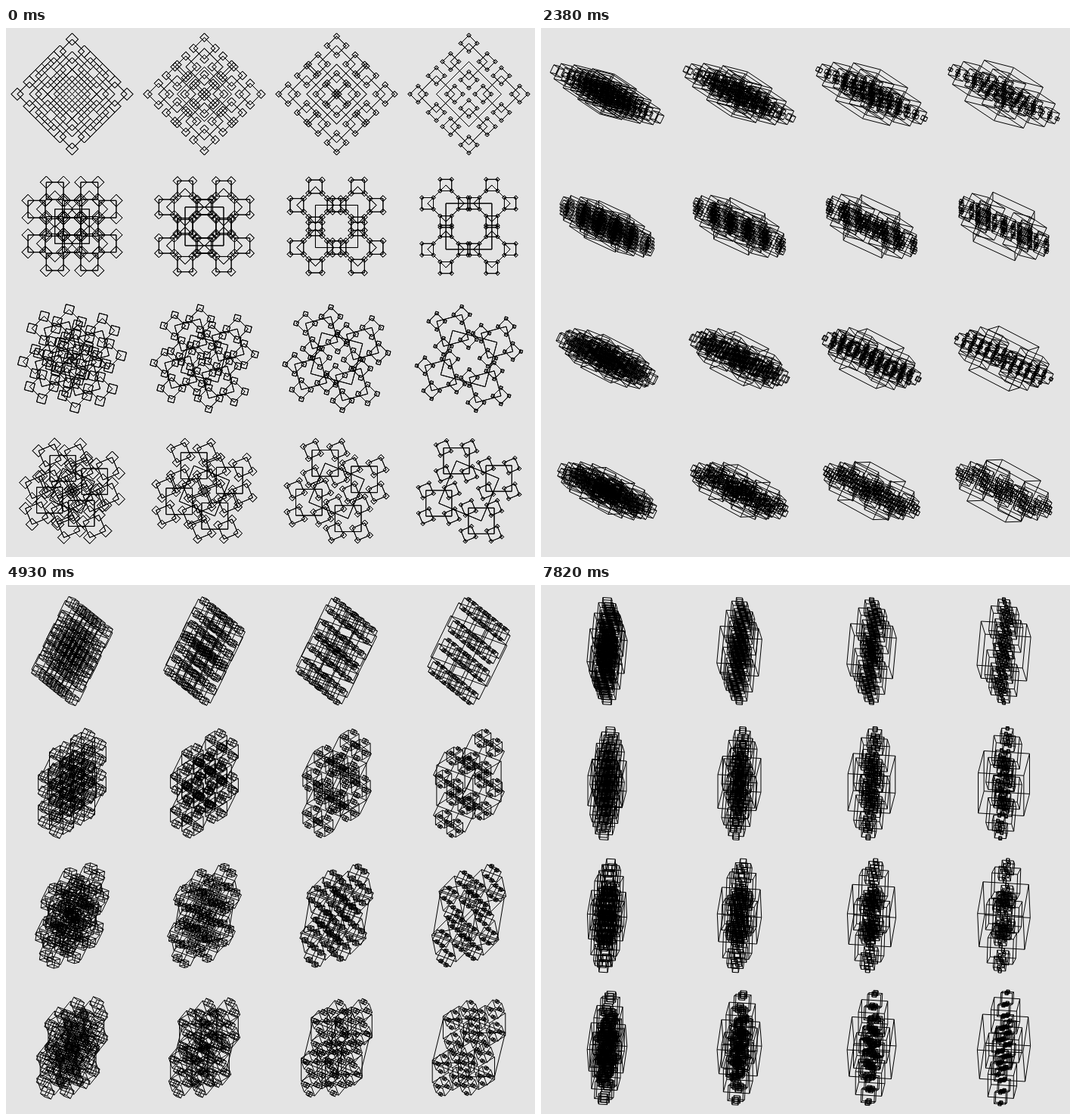
An HTML page with a canvas that plays this animation: 700x700 px, repeating every 7.99 s.

```html
<!DOCTYPE html>
<html lang="en">
<head>
<meta charset="utf-8">
<title>Nested boxes</title>
<style>
  html, body { margin: 0; width: 100%; height: 100%; overflow: hidden; background: #e4e4e4; }
  canvas { display: block; }
</style>
</head>
<body>
<canvas id="stage" width="700" height="700"></canvas>
<script>
const ctx = document.getElementById('stage').getContext('2d');
const STEP = 170, STEPS = 47, CYCLE = 100;
const CELL = 175, REACH = 57 * Math.SQRT2, DEPTH = 4;

// Half diagonals per depth: powers of 4, 3, 2, 1, scaled so that they add up to REACH.
function radii(power) {
  const raw = [4, 3, 2, 1].map(n => n ** power);
  const sum = raw.reduce((a, b) => a + b);
  return raw.map(r => r / sum * REACH);
}

// Four corners of a square, as offsets in the plane of the figure.
function corners(radius, angle) {
  return [0, 1, 2, 3].map(k => {
    const a = angle + k * Math.PI / 2;
    return [radius * Math.cos(a), radius * Math.sin(a)];
  });
}

// Images of the three axes after turning about y, then about x.
function axes(n) {
  const b = n / CYCLE * Math.PI, a = 4 * b;
  return {
    u: [Math.cos(b), Math.sin(a) * Math.sin(b)],
    v: [0, Math.cos(a)],
    w: [Math.sin(b), -Math.sin(a) * Math.cos(b)]
  };
}

function strokeLoop(points, dx, dy) {
  ctx.beginPath();
  for (const [x, y] of points) ctx.lineTo(x + dx, y + dy);
  ctx.closePath();
  ctx.stroke();
}

function drawBox(points, dx, dy) {
  strokeLoop(points, dx, dy);
  strokeLoop(points, -dx, -dy);
  ctx.beginPath();
  for (const [x, y] of points) {
    ctx.moveTo(x - dx, y - dy);
    ctx.lineTo(x + dx, y + dy);
  }
  ctx.stroke();
}

function drawFigure(x, y, levels, { u, v, w }, depth = 0) {
  const { offsets, half } = levels[depth];
  const points = offsets.map(([p, q]) => [
    x + p * u[0] + q * v[0],
    y + p * u[1] + q * v[1]
  ]);
  drawBox(points, half * w[0], half * w[1]);
  if (depth + 1 < DEPTH) {
    for (const [px, py] of points) drawFigure(px, py, levels, { u, v, w }, depth + 1);
  }
}

const figures = [];
for (let row = 0; row < 4; row++) {
  for (let col = 0; col < 4; col++) {
    const twist = Math.PI / 2 / (row + 1);
    const levels = radii(1 + col / 3).map((r, d) => ({
      offsets: corners(r, twist * (d + 1)),
      half: r / Math.SQRT2
    }));
    figures.push({ x: (col + 0.5) * CELL, y: (row + 0.5) * CELL, levels });
  }
}

function draw(step) {
  // The cycle opens on its closing pose, then restarts from the first turn.
  const view = axes(step || CYCLE);
  ctx.fillStyle = '#e4e4e4';
  ctx.fillRect(0, 0, 700, 700);
  ctx.strokeStyle = '#000';
  ctx.lineWidth = 1;
  for (const { x, y, levels } of figures) drawFigure(x, y, levels, view);
}

const start = performance.now();
let shown = 0;
function tick() {
  const step = Math.floor((performance.now() - start) / STEP) % STEPS;
  if (step !== shown) draw(shown = step);
  requestAnimationFrame(tick);
}
draw(0);
requestAnimationFrame(tick);
</script>
</body>
</html>
```
